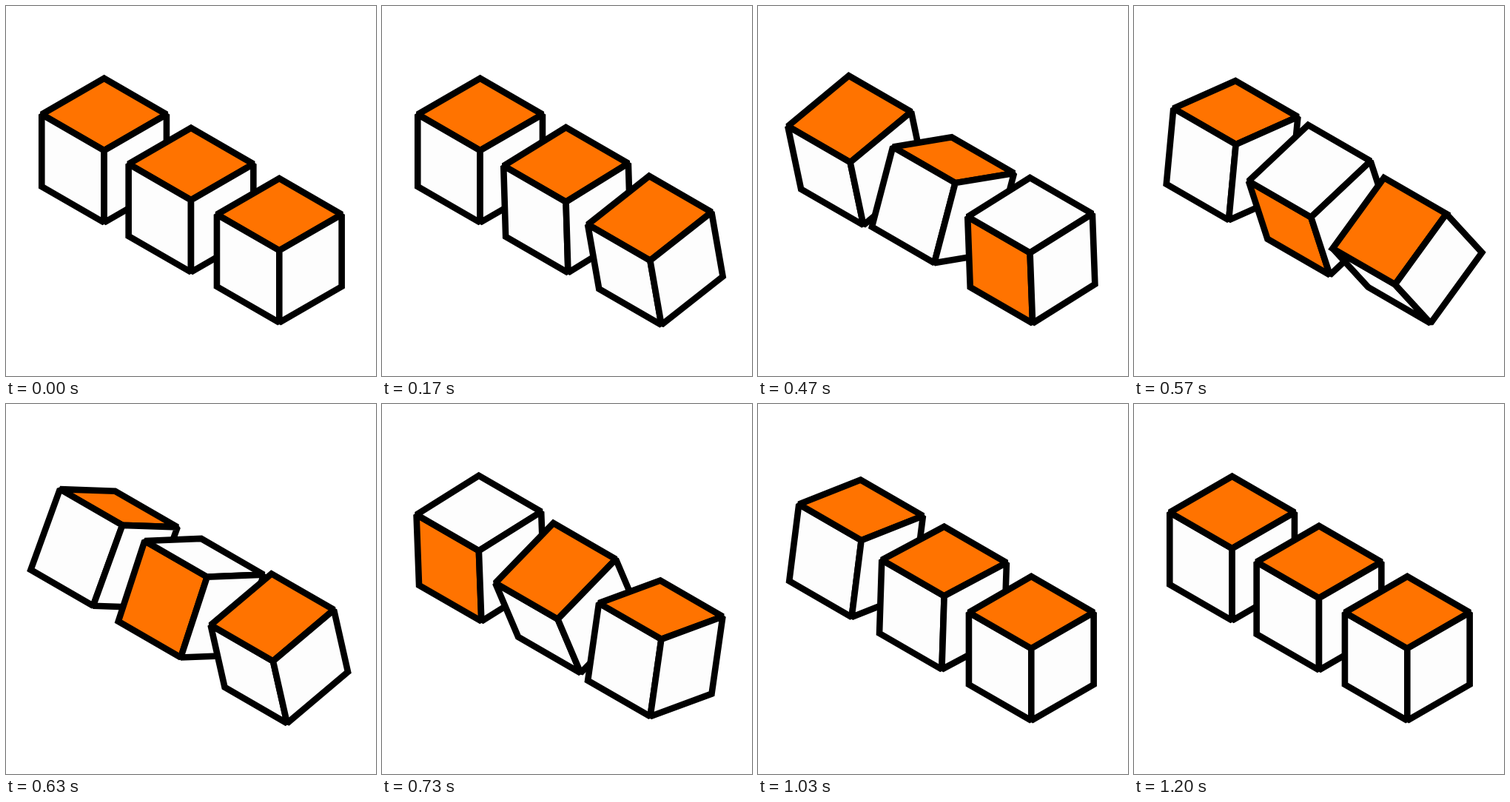
An HTML page with a canvas that plays this animation: 500x500 px, repeating every 1.51 s.

```html
<!DOCTYPE html>
<html lang="en">
<head>
<meta charset="utf-8">
<title>Rolling cubes</title>
<style>
  html, body { margin: 0; width: 100%; height: 100%; overflow: hidden; background: #fff; }
  canvas { display: block; width: 500px; height: 500px; }
</style>
</head>
<body>
<canvas id="stage" width="500" height="500"></canvas>
<script>
const ctx = document.getElementById('stage').getContext('2d');
const LOOP = 1510, LAST = 36;
const SIDE = 97.4, W = SIDE * Math.sqrt(3) / 2, H = SIDE / 2;
const ORANGE = '#ff7300', WHITE = '#fdfdfd';

// Centre and start delay (in ticks of 1/30 s), back to front
const cubes = [
  { x: 132.6, y: 195.2, delay: 8 },
  { x: 250, y: 262.2, delay: 3.7 },
  { x: 369.3, y: 330.4, delay: 0 }
];

// Half turn with wind-up and overshoot: [tick, degrees]
const keys = [
  [0, 0], [1.3, 2], [3, 6.8], [5, 10.4], [7.3, 13.7], [9, -6.5], [11, -27.9],
  [13.3, -72.4], [14, -87.6], [17, -145.3], [18.3, -158.5], [21.4, -190.8],
  [22, -190.2], [23, -188.9], [27.3, -182.2], [28, -180]
];
const slopes = keys.slice(1).map(([x, y], i) => (y - keys[i][1]) / (x - keys[i][0]));
const tangents = keys.map((_, i) => {
  const a = slopes[i - 1] ?? slopes[0], b = slopes[i] ?? a;
  return a * b > 0 ? 2 * a * b / (a + b) : 0;
});

// Monotone cubic through the keys
function angleAt(tick) {
  if (tick <= 0) return 0;
  const i = keys.findIndex(k => k[0] > tick) - 1;
  if (i < 0) return -180;
  const [x0, y0] = keys[i], [x1, y1] = keys[i + 1];
  const h = x1 - x0, s = (tick - x0) / h, r = 1 - s;
  return r * r * (1 + 2 * s) * y0 + s * s * (3 - 2 * s) * y1 +
    h * s * r * (r * tangents[i] - s * tangents[i + 1]);
}

function face(points, fill) {
  ctx.beginPath();
  points.forEach(p => ctx.lineTo(p[0], p[1]));
  ctx.closePath();
  ctx.fillStyle = fill;
  ctx.fill();
  ctx.stroke();
}

function drawCube({ x, y }, degrees) {
  const angle = degrees * Math.PI / 180;
  const c = Math.cos(angle), s = Math.sin(angle);
  // Corner of the right face, p and q in units of half a side
  const corner = (p, q) => {
    const u = (p * c - q * s) / 2, v = (p * s + q * c) / 2;
    return [x + W / 2 + u * W, y + H / 2 - u * H - v * SIDE];
  };
  const back = ([px, py]) => [px - W, py - H];
  const ends = [corner(-1, 1), corner(1, 1), corner(1, -1), corner(-1, -1)];

  for (let k = 0; k < 4; k++) {
    const turn = angle - k * Math.PI / 2;
    if (Math.cos(turn) + Math.sin(turn) < 1e-6) continue;
    const a = ends[k], b = ends[(k + 1) % 4];
    face([a, b, back(b), back(a)], k % 2 ? WHITE : ORANGE);
  }
  face(ends, WHITE);
}

function draw() {
  const t = performance.now() % LOOP;
  const tick = Math.min(LAST, Math.floor((Math.floor(t / 10) + 0.5) * 0.3));
  ctx.fillStyle = '#fff';
  ctx.fillRect(0, 0, 500, 500);
  ctx.lineWidth = 8.6;
  ctx.strokeStyle = '#000';
  ctx.lineJoin = 'miter';
  ctx.miterLimit = 1.5;
  cubes.forEach(cube => drawCube(cube, angleAt(tick - cube.delay)));
  requestAnimationFrame(draw);
}
draw();
</script>
</body>
</html>
```
